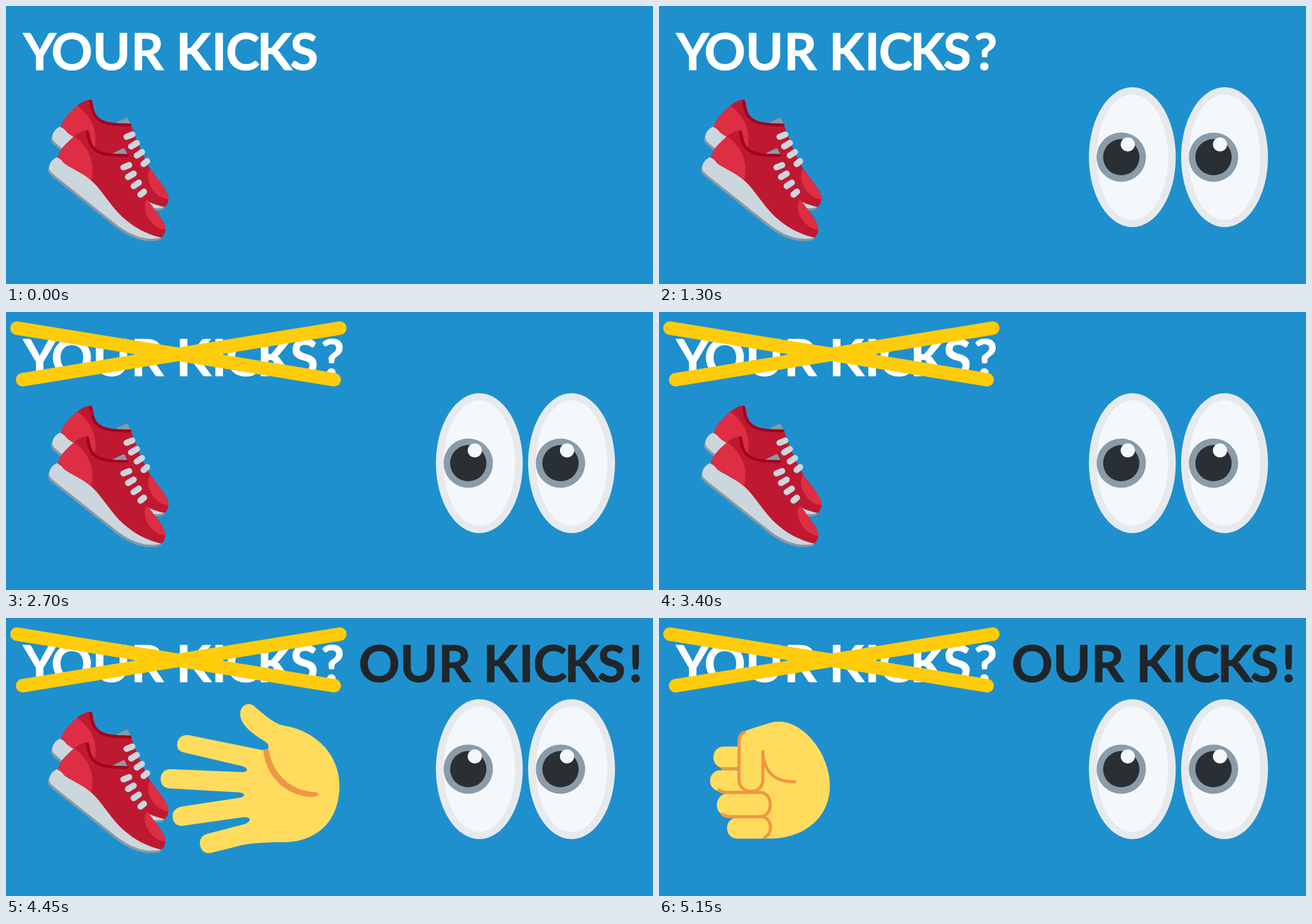
Write an HTML page that moves like this. It is 1140 by 491 pixels and loops after 5.75 s.

```html
<!DOCTYPE html>
<html lang="en">
<head>
<meta charset="utf-8">
<title>Kicks</title>
<style>
html, body { margin: 0; width: 100%; height: 100%; overflow: hidden; background: #1f90ce; }
svg { display: block; width: 100%; height: 100%; }
text { font: 700 90px Lato, sans-serif; text-anchor: middle; stroke-width: 1.2; stroke-linejoin: round; }
.light { fill: #fff; stroke: #fff; }
.dark { fill: #1f2629; stroke: #1f2629; }
.strike { stroke: #ffcc0c; stroke-width: 24; stroke-linecap: round; }
.skin { fill: #ffdc5d; }
.crease { fill: none; stroke: #ef9645; stroke-width: 5.5; stroke-linecap: round; stroke-linejoin: round; }
.lace { stroke: #ccd6dd; stroke-width: 11; stroke-linecap: round; }
</style>
</head>
<body>
<svg viewBox="0 0 1140 491">
  <defs>
    <path id="sole" d="M90 267C80 271 76 279 76 288C78 293 82 296 88 301L196 387C217 403 238 411 256 411C265 411 271 411 276 407L200 340L130 285Z"/>
    <g id="shoe">
      <path fill="#8899a6" d="M184 262L205 252Q209 250 210 254L215 264Z"/>
      <use href="#sole" fill="#8899a6" x="-2" y="4"/>
      <use href="#sole" fill="#ccd6dd"/>
      <path fill="#be1931" d="M91 268C95 252 107 242 120 230C130 222 138 219 144 220Q147 221 148 227C150 249 160 258 185 261L215 264C222 285 234 316 249 342C262 360 275 374 280 388Q283 401 274 409C240 402 212 382 193 360C176 340 165 321 150 308C135 294 112 286 102 277Q96 269 91 268Z"/>
      <path fill="#dd2e44" d="M91 268C95 252 107 242 120 230C145 248 158 275 150 308C135 294 112 286 102 277Q96 269 91 268Z"/>
      <path fill="#dd2e44" d="M249 342C262 360 275 374 280 388L281 395C258 394 242 367 245 350Q246 344 249 342Z"/>
      <path fill="none" stroke="#a0041e" stroke-width="5" stroke-linecap="round" d="M143.500 222C146 245 153 258 178 262Q192 264 213 264"/>
      <path class="lace" d="M207 285L217 281M215 302L225 296M225 318L234 312M237 333L243 328"/>
    </g>
    <g id="eye">
      <ellipse rx="76.500" ry="123.500" fill="#e6eaee"/>
      <ellipse rx="63" ry="111" fill="#f5f8fb"/>
      <circle cx="-19.500" r="43.500" fill="#8a9ba9"/>
      <circle cx="-19.500" r="32" fill="#292f33"/>
      <circle cx="-8" cy="-22.500" r="12.500" fill="#f5f8fb"/>
    </g>
  </defs>

  <g id="hand">
    <path class="skin" d="M582 152C573 153 568 161 568 170C569 189 590 205 612 218Q619 223 618 229Q616 234 606 233L478 207C466 205 457 212 457 224Q457 234 467 237L573 262Q581 265 580 269Q578 273 568 272L446 267C435 267 428 274 428 284C428 294 434 301 445 301L566 308Q575 309 575 313Q574 317 564 318L465 333C455 335 449 341 449 350C449 361 456 368 467 367L572 352Q584 351 585 356Q584 361 576 364L511 381C502 383 497 389 497 398C498 410 505 417 516 415L572 401C600 396 625 396 650 396C712 393 743 350 743 297C743 240 700 199 645 190C628 187 607 168 592 155Q588 152 582 152Z"/>
    <path fill="#ef9645" d="M609 234C612 275 645 314 694 316Q706 315 706 311Q705 307 694 307C658 304 624 276 618 230Q616 234 609 234Z"/>
  </g>

  <g id="shoes">
    <use href="#shoe" x="5.500" y="-54"/>
    <use href="#shoe"/>
  </g>

  <g id="eyes">
    <use href="#eye" x="834" y="267"/>
    <use href="#eye" x="996.500" y="267"/>
  </g>

  <g id="fist">
    <g class="skin">
      <path d="M141 228V216Q142 203 158 197L196 185Q203 183 211 183C256 183 301 240 301 297C301 353 255 389.500 195 389.500H139V228Z"/>
      <rect x="96" y="227" width="60" height="38" rx="18"/>
      <rect x="90" y="269" width="60" height="37" rx="18"/>
      <rect x="102" y="310" width="94" height="40" rx="19"/>
      <rect x="120" y="353" width="76" height="36.500" rx="17"/>
    </g>
    <path class="crease" d="M112 266H140M106 304Q111 308 118 308H178C202 308 202 351 178 351H125Q117 351 112 347M182 351C200 354 201 382 186 387M150 202Q141 207 141 217V286C141 313 183 313 183 286V236M184 246C189 276 207 290 239 289"/>
  </g>

  <g class="light">
    <text id="yours" y="113" x="59.500 116 186 249 290 330.500 375.500 417 473 525.500">YOUR KICKS</text>
    <text id="query" y="113" x="575.500">?</text>
  </g>
  <text id="ours" class="dark" y="113" x="657.500 727.500 790.500 831 871.500 916.500 958.500 1014.500 1067 1109.500">OUR KICKS!</text>
  <path id="down" class="strike" d="M19.500 28.500L578 119.500"/>
  <path id="up" class="strike" d="M588 28.500L29.500 119.500"/>
</svg>
<script>
const LOOP = 5750;
const parts = {};
for (const id of ['yours', 'query', 'ours', 'down', 'up', 'shoes', 'eyes', 'hand', 'fist']) {
  parts[id] = document.getElementById(id);
}

// [start time, visible parts, hand offset]
const steps = [
  [0, 'shoes yours'],
  [600, 'shoes yours query'],
  [950, 'shoes eyes'],
  [1300, 'shoes eyes yours query'],
  [1650, 'shoes eyes'],
  [2000, 'shoes eyes yours query'],
  [2350, 'shoes eyes yours query down'],
  [2700, 'shoes eyes yours query down up'],
  [3050, 'shoes eyes yours query down up ours'],
  [3400, 'shoes eyes yours query down up'],
  [3750, 'shoes eyes yours query down up ours hand', 155.5],
  [4100, 'shoes eyes yours query down up hand', 0],
  [4450, 'shoes eyes yours query down up ours hand', -155.5],
  [4800, 'shoes eyes yours query down up hand', -311],
  [5150, 'fist eyes yours query down up ours']
];

let current;
function show(step) {
  if (step === current) return;
  current = step;
  const visible = step[1].split(' ');
  for (const id in parts) {
    parts[id].style.display = visible.includes(id) ? '' : 'none';
  }
  parts.hand.setAttribute('transform', `translate(${step[2] || 0} 0)`);
}

const start = performance.now();
function tick() {
  const time = (performance.now() - start) % LOOP;
  show(steps.findLast(step => step[0] <= time));
  requestAnimationFrame(tick);
}
tick();
</script>
</body>
</html>
```
